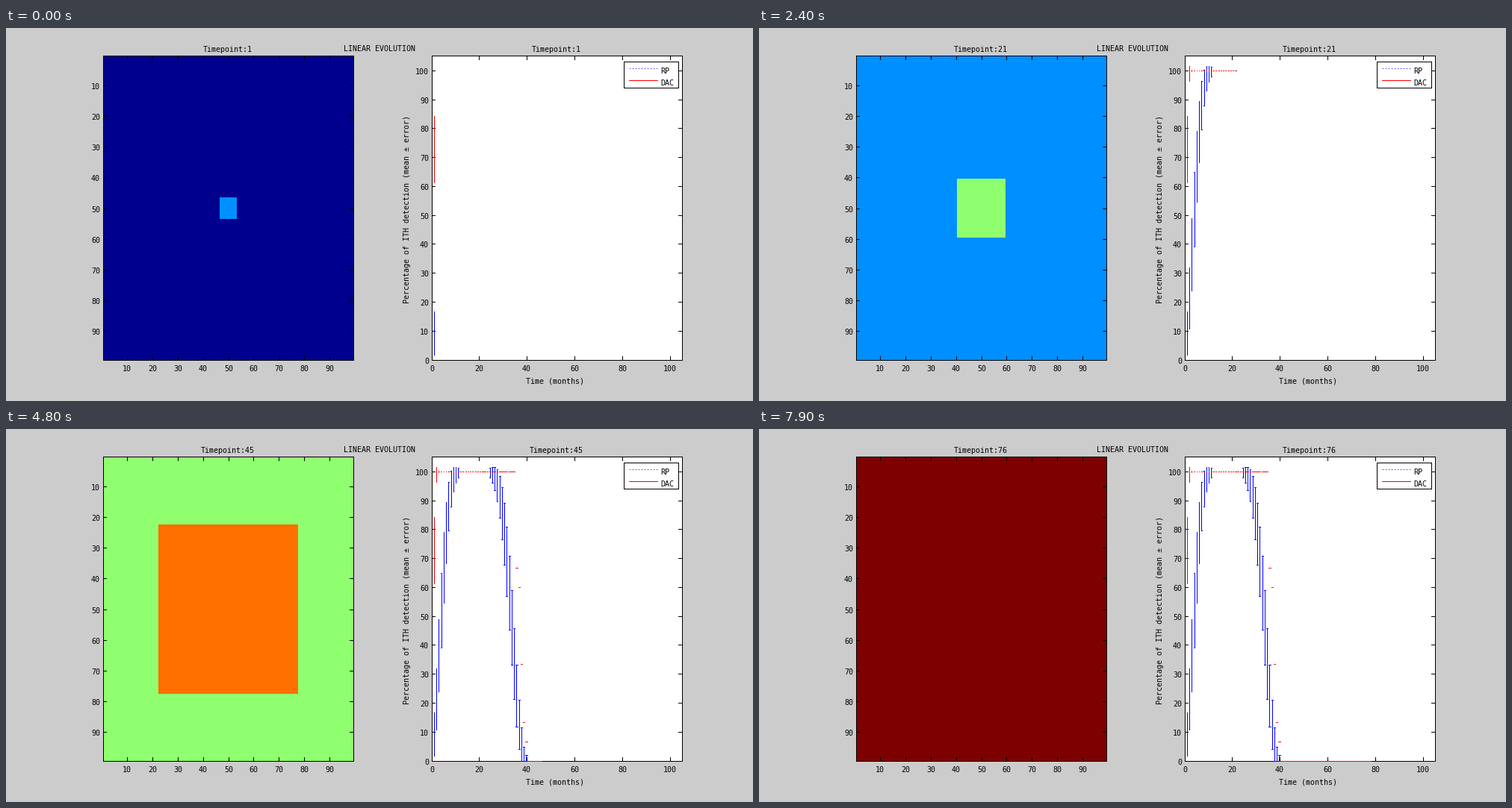
A matplotlib script that plays this animation: 1000x500 px, repeating every 8 s.

```python
from math import exp, floor, sqrt

import matplotlib.pyplot as plt
from matplotlib.animation import FuncAnimation
from matplotlib.patches import Rectangle

W, H, DPI = 1000, 500, 100
FRAMES, INTERVAL, HOLD = 80, 100, 4
LAST = FRAMES - HOLD

# Box edges in pixels
TOP, BOTTOM = 37, 445
LEFT_BOX, RIGHT_BOX = (130, 465), (570, 905)

LEVELS = ["#00008f", "#008fff", "#8fff6f", "#ff6f00", "#7f0000"]
CLONE_PERIOD = 18
BLUE, RED = "#0000ff", "#ff0000"
RUNS, BIOPSIES = 15, 10

fig = plt.figure(figsize=(W / DPI, H / DPI), dpi=DPI, facecolor="#cccccc")
ax = fig.add_axes([0, 0, 1, 1])
ax.set_xlim(0, W)
ax.set_ylim(H, 0)
ax.axis("off")


def box(x0, y0, x1, y1, color, z=3):
    """Fill the pixels from (x0, y0) to (x1, y1), both included."""
    return ax.add_patch(Rectangle((x0, y0), x1 - x0 + 1, y1 - y0 + 1, lw=0,
                                  fc=color, antialiased=False, zorder=z))


def outline(x0, y0, x1, y1, z=4):
    for edge in ((x0, y0, x1, y0), (x0, y1, x1, y1),
                 (x0, y0, x0, y1), (x1, y0, x1, y1)):
        box(*edge, "black", z)


def label(x, y, text, ha="center", rotation=0):
    return ax.text(x, y, text, ha=ha, va="baseline", rotation=rotation,
                   rotation_mode="anchor", family="DejaVu Sans Mono",
                   size=10 * 72 / DPI, color="black", zorder=8)


def month_x(value):
    return floor(570.05 + value * 335 / 105)


def percent_y(value):
    return floor(445 - value * 407 / 105)


def cell_x(value):
    return floor(130.5 + (value - 0.5) * 335 / 99)


def cell_y(value):
    return round(38 + (value - 0.5) * 407 / 99)


def x_tick(x, text):
    box(x, BOTTOM - 5, x, BOTTOM, "black", 4)
    box(x, TOP, x, TOP + 5, "black", 4)
    label(x, 460, text)


def y_tick(y, text, edges):
    left, right = edges
    box(left, y, left + 4, y, "black", 4)
    box(right - 5, y, right, y, "black", 4)
    label(left - 4, y + 5, text, ha="right")


def draw_axes():
    for v in range(10, 100, 10):
        x_tick(cell_x(v), str(v))
        y_tick(cell_y(v), str(v), LEFT_BOX)
    for v in range(0, 101, 20):
        x_tick(month_x(v), str(v))
    for v in range(0, 101, 10):
        y_tick(percent_y(v), str(v), RIGHT_BOX)
    for x0, x1 in (LEFT_BOX, RIGHT_BOX):
        outline(x0, TOP, x1, BOTTOM)
    label(499.5, 31, "LINEAR EVOLUTION")
    label(735.5, 476, "Time (months)")
    label(540, 243, "Percentage of ITH detection (mean ± error)", rotation=90)


def draw_legend():
    box(827, 45, 900, 80, "white", 6)
    outline(827, 45, 900, 80, 7)
    for x in range(835, 873, 4):
        box(x, 54, x, 54, BLUE, 7)
    box(834, 70, 872, 70, RED, 7)
    label(876.5, 61, "RP", ha="left")
    label(876.5, 77, "DAC", ha="left")


def hit_rate(side):
    """Chance that any biopsy meets a region with this relative side."""
    return 1 - (1 - min(side, 1) ** 2) ** BIOPSIES


def rp_mean(t):
    growing = (5.6 * t + 4) / 99
    left = 0.0445 * (38.4 - t)
    shrinking = (left + sqrt(left ** 2 + 0.004)) / 2
    rate = min(hit_rate(growing), hit_rate(shrinking))
    return round(rate * 250) / 250


def dac_mean(t):
    if t < 35:
        return 1 - exp(-1.3 * t ** 1.8)
    return round(10.9 / (1 + exp(1.3 * (t - 37)))) / RUNS


def error_bar(t, mean, spread, color):
    """Bar around the mean; its caps widen with the elapsed time."""
    month = 1.02 * t
    x, x0, x1 = (month_x(month * k) for k in (1, 0.99, 1.01))
    y0 = percent_y(100 * (mean + spread))
    y1 = percent_y(100 * max(mean - spread, 0))
    return [box(x0, y0, x1, y0, color, 5), box(x0, y1, x1, y1, color, 5),
            box(x, y0, x, y1, color, 5)]


def points(t):
    """All marks added to the chart at timepoint t."""
    rp, dac = rp_mean(t), dac_mean(t)
    rp_error = sqrt(rp * (1 - rp) / RUNS)
    dac_error = sqrt(dac * (1 - dac) / RUNS) if t < 35 else 0
    return error_bar(t, rp, rp_error, BLUE) + error_bar(t, dac, dac_error, RED)


grid = box(LEFT_BOX[0], TOP, LEFT_BOX[1], BOTTOM, LEVELS[0], 1)
clone = box(0, 0, 0, 0, LEVELS[1], 2)
box(RIGHT_BOX[0], TOP, RIGHT_BOX[1], BOTTOM, "white", 1)
draw_axes()
draw_legend()
titles = [label(x, 32, "") for x in (297, 736.5)]
marks = {t: points(t) for t in range(1, LAST + 1)}


def draw_clone(t):
    step = min((t - 1) // CLONE_PERIOD, len(LEVELS) - 2)
    half = min(3.5 + 3 * (t - 1 - CLONE_PERIOD * step), 49.5)
    x0, x1 = cell_x(50 - half), cell_x(50 + half)
    y0, y1 = cell_y(50 - half), cell_y(50 + half)
    grid.set_facecolor(LEVELS[step])
    clone.set_facecolor(LEVELS[step + 1])
    clone.set_bounds(x0, y0, x1 - x0, y1 - y0)


def update(frame):
    t = max(1, frame - HOLD + 1)
    draw_clone(t)
    for title in titles:
        title.set_text(f"Timepoint:{t}")
    for when, parts in marks.items():
        for part in parts:
            part.set_visible(when <= t)
    return []


anim = FuncAnimation(fig, update, frames=FRAMES, interval=INTERVAL,
                     repeat=True, repeat_delay=0, blit=False)
plt.show()
```
